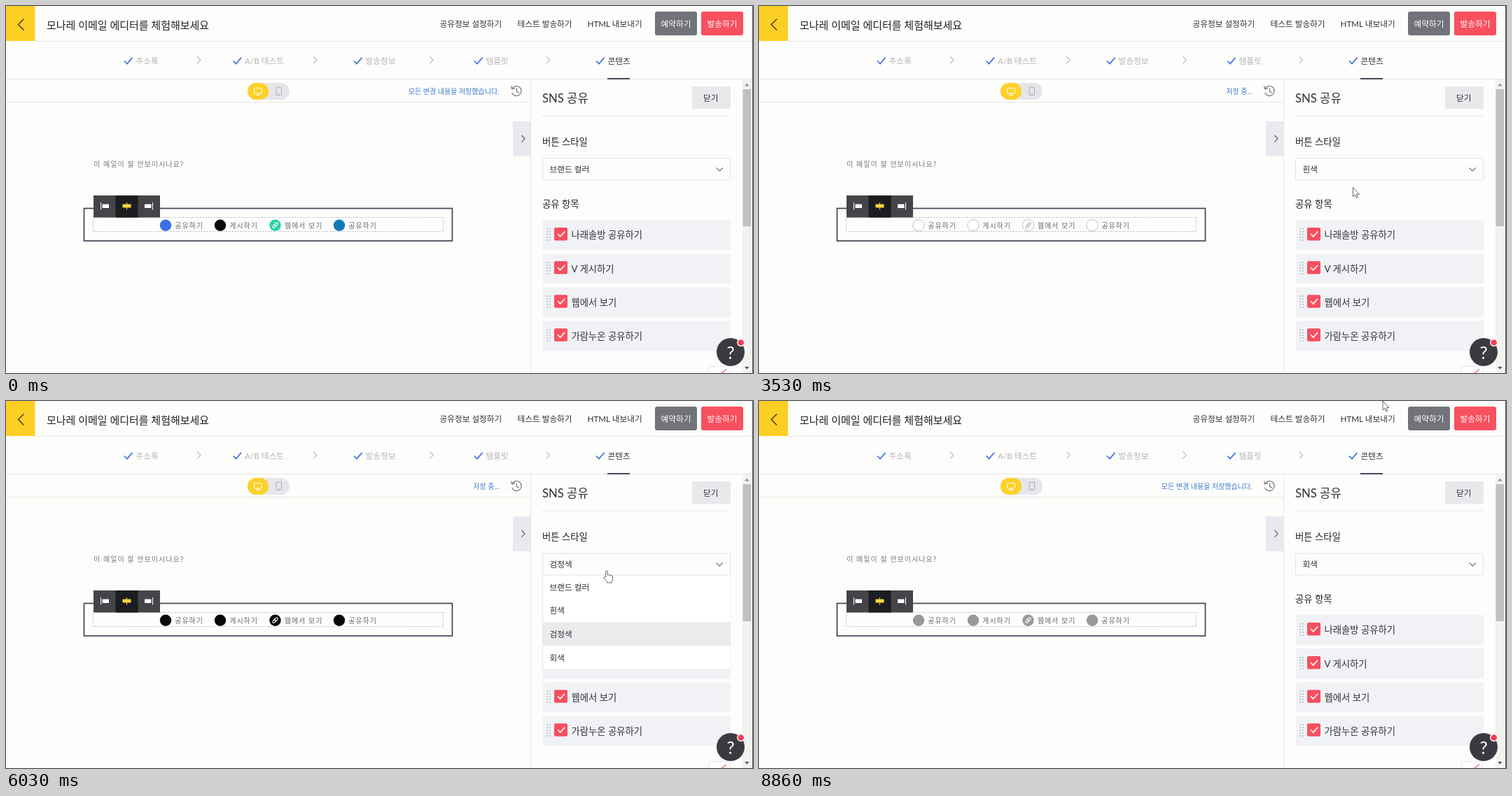
Write an HTML page that moves like this. It is 1067 by 525 pixels and loops after 8890 ms.

```html
<!DOCTYPE html>
<html lang="ko">
<head>
<meta charset="utf-8">
<title>이메일 에디터</title>
<style>
  html, body { margin: 0; width: 100%; height: 100%; overflow: hidden; background: #fdfdfb; }
  svg { display: block; width: 1067px; height: 525px; }
  text { font-family: Lato, "Noto Sans CJK KR", "Noto Sans CJK", sans-serif; white-space: pre; }
  .mail { font-family: "Noto Sans CJK KR", "Noto Sans CJK", sans-serif; letter-spacing: 1px; }
</style>
</head>
<body>
<svg id="stage" viewBox="0 0 1067 525" xmlns="http://www.w3.org/2000/svg"></svg>
<script>
const LOOP = 8890;
const SVG = "http://www.w3.org/2000/svg";
const stage = document.getElementById("stage");
const DARK = "#303136", PAPER = "#fdfdfb", RULE = "#e6e6e3";
const STYLES = ["브랜드 컬러", "흰색", "검정색", "회색"];

function add(tag, attrs, parent = stage) {
  const node = document.createElementNS(SVG, tag);
  for (const key in attrs) node.setAttribute(key, attrs[key]);
  parent.appendChild(node);
  return node;
}
const group = (parent = stage) => add("g", {}, parent);
const rect = (x, y, width, height, fill, more = {}, parent) =>
  add("rect", { x, y, width, height, fill, ...more }, parent);
const line = (d, stroke, width = 1, more = {}, parent) =>
  add("path", { d, stroke, "stroke-width": width, fill: "none", ...more }, parent);
const dot = (cx, cy, r, fill, more = {}, parent) =>
  add("circle", { cx, cy, r, fill, ...more }, parent);

// Places text by its left edge and vertical middle.
function label(x, cy, size, str, fill = DARK, more = {}, parent) {
  const node = add("text", { x, y: cy + size * 0.37, "font-size": size, fill, ...more }, parent);
  node.textContent = str;
  return node;
}
const show = (node, on) => node.setAttribute("visibility", on ? "visible" : "hidden");

function drawHeader() {
  rect(0, 0, 41.5, 50, "#fccf24");
  line("M25.5 18.5L17.5 26.5L25.5 34.5", "#3a3420", 1.4);
  label(58, 27, 15, "모나레 이메일 에디터를 체험해보세요", "#222", { "font-weight": 500 });
  label(619.5, 25.5, 11.67, "공유정보 설정하기");
  label(730.5, 25.5, 11.67, "테스트 발송하기");
  label(830.5, 25.5, 11.67, "HTML 내보내기");
  rect(927, 8, 60, 34, "#717378", { rx: 3 });
  rect(993, 8, 60, 34, "#f8505f", { rx: 3 });
  label(935.5, 25.5, 11.67, "예약하기", "#fff");
  label(1001.5, 25.5, 11.67, "발송하기", "#fff");
  line("M41 50.5H1065M0 104.5H1065", RULE);
}

function drawSteps() {
  const steps = [[169, "주소록"], [324.5, "A/B 테스트"], [497, "발송정보"], [669, "템플릿"], [843, "콘텐츠"]];
  steps.forEach(([x, name], i) => {
    line(`M${x} 78.5l4 4.2l7.5 -8.8`, "#4a78e2", 1.8);
    label(x + 16.5, 78.5, 11.67, name, i === 4 ? DARK : "#b4b4b4");
    if (i < 4) line(`M${273 + i * 166.2} 72.5l5 5l-5 5`, "#bcbcbc", 1.1);
  });
  rect(859, 103, 32, 2, "#45475c");
}

function drawToolbar() {
  line("M0 137.5H749", RULE);
  rect(345, 110, 60, 24, "#e5e6ea", { rx: 12 });
  rect(345, 110, 30, 24, "#fcd129", { rx: 12 });
  rect(354.5, 117.5, 11, 7.5, "none", { stroke: "#fff", rx: 1 });
  line("M360 125v2M357 127.5h6", "#fff");
  rect(386, 116, 7.5, 11.5, "none", { stroke: "#aaacb2", rx: 1 });
  line("M388.5 125.5h2.5", "#aaacb2", 0.8);
  line("M723.2 117.8A7 7 0 1 1 722.6 124M721.5 114.5l1.2 4.2l4.2 -1M729.5 117.5v4.8l3.5 2", "#77787c", 1.2);
}

function drawCanvas() {
  rect(724, 165, 25, 50, "#e9eaf0");
  line("M736.5 185l4.5 4.8l-4.5 4.8", "#55565c", 1.1);
  label(125, 226.5, 10, "이 메일이 잘 안보이시나요?", "#777", { class: "mail" });
  rect(111.5, 289.5, 526, 46.5, "none", { stroke: "#434454", "stroke-width": 1.7 });
  rect(124.5, 302.5, 500, 20, "none", { stroke: "#b5b5d2", "stroke-dasharray": "2 2" });
  rect(125, 271, 95, 31.5, "#434549");
  rect(156.5, 271, 32, 31.5, "#1c1d20");
  rect(135, 281, 1, 10.5, "#fff");
  rect(137.5, 283.5, 9.5, 5.5, "#fff");
  rect(166.5, 283.5, 12, 5, "#f7d63d");
  rect(172, 281, 1, 10.5, "#f7d63d");
  rect(198, 283.5, 9.5, 5.5, "#fff");
  rect(209, 281, 1, 10.5, "#fff");
}

function drawShareLinks() {
  const links = [[228, "공유하기"], [306, "게시하기"], [384.5, "웹에서 보기"], [476, "공유하기"]];
  const discs = links.map(([x, name]) => {
    label(x + 13.2, 314, 10, name, "#66676b", { class: "mail" });
    return dot(x, 313.7, 8.2, "#fff");
  });
  const chain = add("g", { transform: "translate(384.5 313.7) rotate(-45)", fill: "none", "stroke-width": 1.1 });
  for (const x of [-4.6, -0.6])
    add("rect", { x, y: -1.7, width: 5.2, height: 3.4, rx: 1.7 }, chain);
  return { discs, chain };
}

function drawCheckRow(i, name) {
  const y = 306 + i * 48.1;
  rect(766.5, y, 268.5, 43, "#f1f2f6");
  for (let k = 0; k < 10; k++)
    rect(772.5 + (k % 2) * 3.8, y + 12 + (k >> 1) * 4, 1.5, 1.5, "#a6a7ab");
  rect(783, y + 11, 19, 18.5, "#f64f60", { rx: 2 });
  line(`M788 ${y + 20}l3.6 3.8l6.6 -7.2`, "#fff", 1.6);
  label(807.5, y + 21.5, 13.33, name);
}

function drawPanel() {
  rect(749, 105, 303, 420, PAPER);
  line("M749.5 105V525", RULE);
  label(766, 131.5, 16.67, "SNS 공유", DARK, { "font-weight": 400 });
  rect(980, 115, 55, 32, "#e8e9ed", { rx: 1 });
  label(996, 131.5, 11.67, "닫기");
  line("M766 157H1035", "#d6d6d4", 1, { "stroke-dasharray": "2 2" });
  label(766, 194.5, 13.33, "버튼 스타일", "#222", { "font-weight": 500 });
  label(766, 283, 13.33, "공유 항목", "#222", { "font-weight": 500 });
  ["나래솔방 공유하기", "V 게시하기", "웹에서 보기", "가람누온 공유하기"]
    .forEach((name, i) => drawCheckRow(i, name));
  rect(1003.5, 515.5, 30, 14, "#fff", { stroke: "#e4e4ec", rx: 2 });
  line("M1021 526L1029 520", "#e2685f", 1.3);
}

function drawSelect() {
  const border = { stroke: "#e3e4ec", rx: 1 };
  rect(766.5, 218, 268, 31, PAPER, border);
  const value = label(776.5, 233.7, 11.67, "");
  line("M1014.5 231.3l4.7 4.7l4.7 -4.7", "#66676c", 1.1);
  const menu = group();
  rect(766.5, 249.5, 268, 135, "#fff", border, menu);
  const rows = STYLES.map((name, i) => {
    const y = 249.5 + i * 33.6;
    const row = rect(767, y, 267.5, 33.6, "#fff", {}, menu);
    label(776.5, y + 17, 11.67, name, DARK, {}, menu);
    return row;
  });
  return { value, menu, rows };
}

function drawScrollbar() {
  rect(1052, 105, 13, 420, "#f2f2f1");
  rect(1052.5, 119, 11.5, 196, "#bfc0c1");
  add("path", { d: "M1055 114.5l3.3 -3.8l3.3 3.8z", fill: "#8b8c8e" });
  add("path", { d: "M1055 516l3.3 3.8l3.3 -3.8z", fill: "#55565a" });
  rect(1066, 0, 1, 525, "#4a4a4a");
}

function drawHelp() {
  dot(1035, 495, 20, "#393b40");
  label(1035, 495.3, 25, "?", "#fff", { "text-anchor": "middle" });
  dot(1049.7, 481.5, 5, "#ef4258", { stroke: "#fff", "stroke-width": 1.3 });
}

function drawCursor() {
  const cursor = group();
  const skin = { fill: "#fff", stroke: "#55555f", "stroke-width": 0.9, "stroke-linejoin": "round" };
  const hand = add("path", {
    d: "M-1.3 9V1Q-1.3 0 0 0Q1.3 0 1.3 1V6Q2.6 5 3.8 6.3Q5 5.6 6.2 6.9Q8.6 6.2 8.6 8.5V12Q8.2 14 7.2 15V17H0.4V15.4L-4 10.4Q-4.4 8.8 -2.8 8.8Z",
    ...skin }, cursor);
  const arrow = add("path", { d: "M0 0V13L3 10.3L5 15L7 14.1L5 9.6H9Z", ...skin }, cursor);
  return { cursor, hand, arrow };
}

drawHeader();
drawSteps();
drawToolbar();
const status = label(704.5, 121.8, 10, "", "#3f7bd0", { "text-anchor": "end" });
drawCanvas();
const { discs, chain } = drawShareLinks();
drawPanel();
const { value, menu, rows } = drawSelect();
drawScrollbar();
drawHelp();
const { cursor, hand, arrow } = drawCursor();

// Pointer stops: time, x, y.
const PATH = [
  [850, 896, -22], [1480, 876, 232], [2150, 876, 232], [2680, 845, 300], [3250, 845, 300],
  [3700, 850, 241], [4250, 850, 241], [4750, 856, 331], [5200, 856, 331],
  [5650, 858, 243], [6120, 858, 243], [6500, 852, 363], [7850, 851, 363],
  [8780, 891, 0], [LOOP, 891, 0]
];
const PICKS = [3150, 5100, 6620];
const SAVING = [[3150, 4420], [5100, 6300], [6620, 7400]];
const OPEN = [[1900, 3150], [3850, 5100], [5780, 6620]];
const PALETTES = [
  ["#3b6fe6", "#08080a", "#29d2a5", "#0f79b8"],
  Array(4).fill("#fff"), Array(4).fill("#08080a"), Array(4).fill("#98999d")
];

const within = (spans, t) => spans.some(([a, b]) => t >= a && t < b);
const ease = u => u * u * (3 - 2 * u);

function pointer(t) {
  const i = PATH.findIndex(stop => stop[0] > t);
  if (i < 1) return PATH[0].slice(1);
  const [t0, x0, y0] = PATH[i - 1], [t1, x1, y1] = PATH[i];
  const u = ease((t - t0) / (t1 - t0));
  return [x0 + (x1 - x0) * u, y0 + (y1 - y0) * u];
}

function render(t) {
  const [x, y] = pointer(t);
  const open = within(OPEN, t);
  const picked = PICKS.filter(p => t >= p).length;
  const hover = Math.floor((y - 249.5) / 33.6);

  value.textContent = STYLES[picked];
  status.textContent = within(SAVING, t) ? "저장 중..." : "모든 변경 내용을 저장했습니다.";
  show(menu, open);
  rows.forEach((row, i) =>
    row.setAttribute("fill", i === picked || i === hover ? "#ebebee" : "#fff"));

  const pale = picked === 1;
  discs.forEach((disc, i) => {
    disc.setAttribute("fill", PALETTES[picked][i]);
    disc.setAttribute("stroke", pale ? "#c2c2b6" : "none");
  });
  chain.setAttribute("stroke", pale ? "#b3b3aa" : "#fff");

  const overControl = x > 766 && x < 1035 && ((y > 217 && y < 250) || (open && y < 384) && y > 217 || y > 306);
  cursor.setAttribute("transform", `translate(${x.toFixed(2)} ${y.toFixed(2)})`);
  show(hand, overControl);
  show(arrow, !overControl);
}

const start = performance.now();
function tick() {
  render((performance.now() - start) % LOOP);
  requestAnimationFrame(tick);
}
tick();
</script>
</body>
</html>
```
